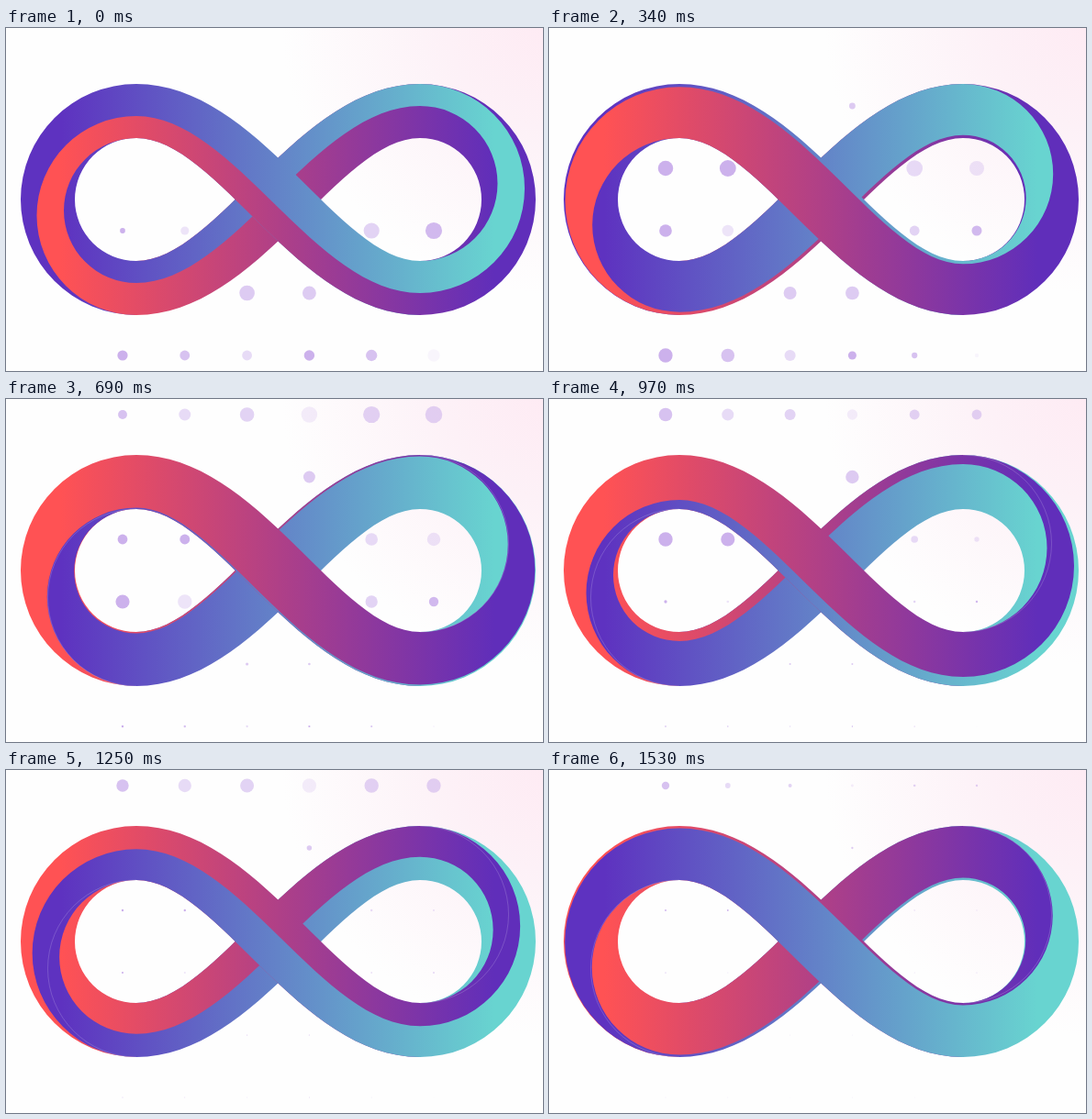
Recreate the animation shown at these times as an HTML page with a canvas. Size 585 px wide and 374 px high, loop 1.61 s.

```html
<!DOCTYPE html>
<html lang="en">
<head>
<meta charset="utf-8">
<title>Infinity ribbon</title>
<style>
html, body { margin: 0; width: 100%; height: 100%; overflow: hidden; background: #fefefe; }
canvas { display: block; }
</style>
</head>
<body>
<canvas id="stage" width="585" height="374"></canvas>
<script>
const ctx = document.getElementById('stage').getContext('2d');
const LOOP = 1610, STEP = 70, SWAP = 580, HALF = 1170;
const LEFT = 142, RIGHT = 451;
const TOP = 61, HOLE_TOP = 120, HOLE_BOTTOM = 254, BOTTOM = 313, BAND = 59;

// [time, value] keys
const FOLD = [[-600, 0], [-480, 1.5], [-200, 10], [0, 24], [80, 33.7],
  [200, 47], [360, 56.5], [480, 58.6], [600, 59]];
const PULSE = [[0, 0], [60, 3.5], [170, 8.2], [240, 9.2], [300, 9], [400, 6.6],
  [480, 5.6], [560, 5.5], [700, 7.3], [800, 7.7], [860, 7.1], [960, 3],
  [1040, 1.4], [1200, 1.2], [1600, 0.6], [2400, 0]];

// Dot opacity in tenths, one string per grid row
const DOTS = ['745255', '000600', '990043', '930058', '006600', '974971'];

const lerp = (a, b, k) => a + (b - a) * k;

// Smooth curve through the keys
function curve(keys, t) {
  const last = keys.length - 1;
  if (t <= keys[0][0]) return keys[0][1];
  if (t >= keys[last][0]) return keys[last][1];
  let i = 0;
  while (t > keys[i + 1][0]) i++;
  const slope = j => {
    const a = keys[Math.max(j - 1, 0)], b = keys[Math.min(j + 1, last)];
    return (b[1] - a[1]) / (b[0] - a[0]);
  };
  const [t0, v0] = keys[i], [t1, v1] = keys[i + 1];
  const h = t1 - t0, u = (t - t0) / h, s = u * u * (3 - 2 * u);
  return lerp(v0, v1, s) + h * u * (1 - u) * (slope(i) * (1 - u) - slope(i + 1) * u);
}

function gradient(from, to) {
  const g = ctx.createLinearGradient(60, 0, 532, 0);
  g.addColorStop(0, from);
  g.addColorStop(1, to);
  return g;
}
const warm = gradient('#ff5254', '#602eba');
const cool = gradient('#5e32c0', '#68d4d0');

const glow = ctx.createRadialGradient(600, -10, 0, 600, -10, 300);
glow.addColorStop(0, '#feeaf3');
glow.addColorStop(0.4, '#fdf1f7');
glow.addColorStop(1, '#fefefe');

// Part of a diagonal strand, d0..d1 measured from its outer edge at the left
function strand(d0, d1, flip, fill) {
  if (d1 - d0 < 0.05) return;
  const bend = d => [lerp(133.5, 89, d / BAND), lerp(89, 133.5, d / BAND)];
  const [a0, b0] = bend(d0), [a1, b1] = bend(d1);
  const l0 = TOP + d0, l1 = TOP + d1, r0 = HOLE_BOTTOM + d0, r1 = HOLE_BOTTOM + d1;
  ctx.save();
  if (flip) ctx.transform(1, 0, 0, -1, 0, 374);
  ctx.beginPath();
  ctx.moveTo(LEFT - 0.6, l0);
  ctx.lineTo(LEFT, l0);
  ctx.bezierCurveTo(LEFT + a0, l0, RIGHT - b0, r0, RIGHT, r0);
  ctx.lineTo(RIGHT + 0.6, r0);
  ctx.lineTo(RIGHT + 0.6, r1);
  ctx.lineTo(RIGHT, r1);
  ctx.bezierCurveTo(RIGHT - b1, r1, LEFT + a1, l1, LEFT, l1);
  ctx.lineTo(LEFT - 0.6, l1);
  ctx.fillStyle = fill;
  ctx.fill();
  ctx.restore();
}

function halfArc(x, top, bottom, upward) {
  const q = Math.PI / 2, ccw = (x === LEFT) !== upward;
  ctx.arc(x, (top + bottom) / 2, (bottom - top) / 2, upward ? q : -q, upward ? -q : q, ccw);
}

function halfRing(x, outerTop, outerBottom, innerTop, innerBottom, fill) {
  ctx.beginPath();
  halfArc(x, outerTop, outerBottom, false);
  halfArc(x, innerTop, innerBottom, true);
  ctx.fillStyle = fill;
  ctx.fill();
}

function seam(x, top, bottom) {
  ctx.beginPath();
  halfArc(x, top, bottom, false);
  ctx.lineWidth = 0.7;
  ctx.strokeStyle = 'rgba(255,255,255,0.25)';
  ctx.stroke();
}

function drawDots(t) {
  DOTS.forEach((line, row) => [...line].forEach((tenths, col) => {
    const r = curve(PULSE, t - 600 + 216 * row + 34 * col);
    if (r <= 0 || tenths === '0') return;
    ctx.beginPath();
    ctx.arc(127 + 67.8 * col, 17 + 68 * row, r, 0, 2 * Math.PI);
    ctx.fillStyle = `rgba(198,168,234,${tenths / 10})`;
    ctx.fill();
  }));
}

function drawRibbon(t) {
  const second = t >= SWAP;
  const w = curve(FOLD, second ? t - HALF : t);
  const [over, base] = second ? [cool, warm] : [warm, cool];

  strand(0, BAND, true, over);
  strand(BAND - w, BAND, true, base);
  strand(0, BAND, false, base);
  strand(BAND - w, BAND, false, over);

  halfRing(LEFT, TOP, BOTTOM, HOLE_TOP, HOLE_BOTTOM, base);
  halfRing(LEFT, HOLE_TOP - w, BOTTOM, HOLE_TOP, HOLE_BOTTOM + w, over);
  halfRing(RIGHT, TOP, BOTTOM, HOLE_TOP, HOLE_BOTTOM, over);
  halfRing(RIGHT, TOP, BOTTOM - w, TOP + w, HOLE_BOTTOM, base);

  if (second) {
    seam(LEFT, HOLE_TOP, BOTTOM);
    seam(RIGHT, TOP, HOLE_BOTTOM);
  }
}

// The picture advances in steps; the third one is slightly short
function stepTime(t) {
  const start = t < 200 ? 0 : 200;
  return start + Math.floor((t - start) / STEP) * STEP;
}

function frame() {
  const t = stepTime(performance.now() % LOOP);
  ctx.fillStyle = glow;
  ctx.fillRect(0, 0, 585, 374);
  drawDots(t);
  drawRibbon(t);
  requestAnimationFrame(frame);
}
frame();
</script>
</body>
</html>
```
